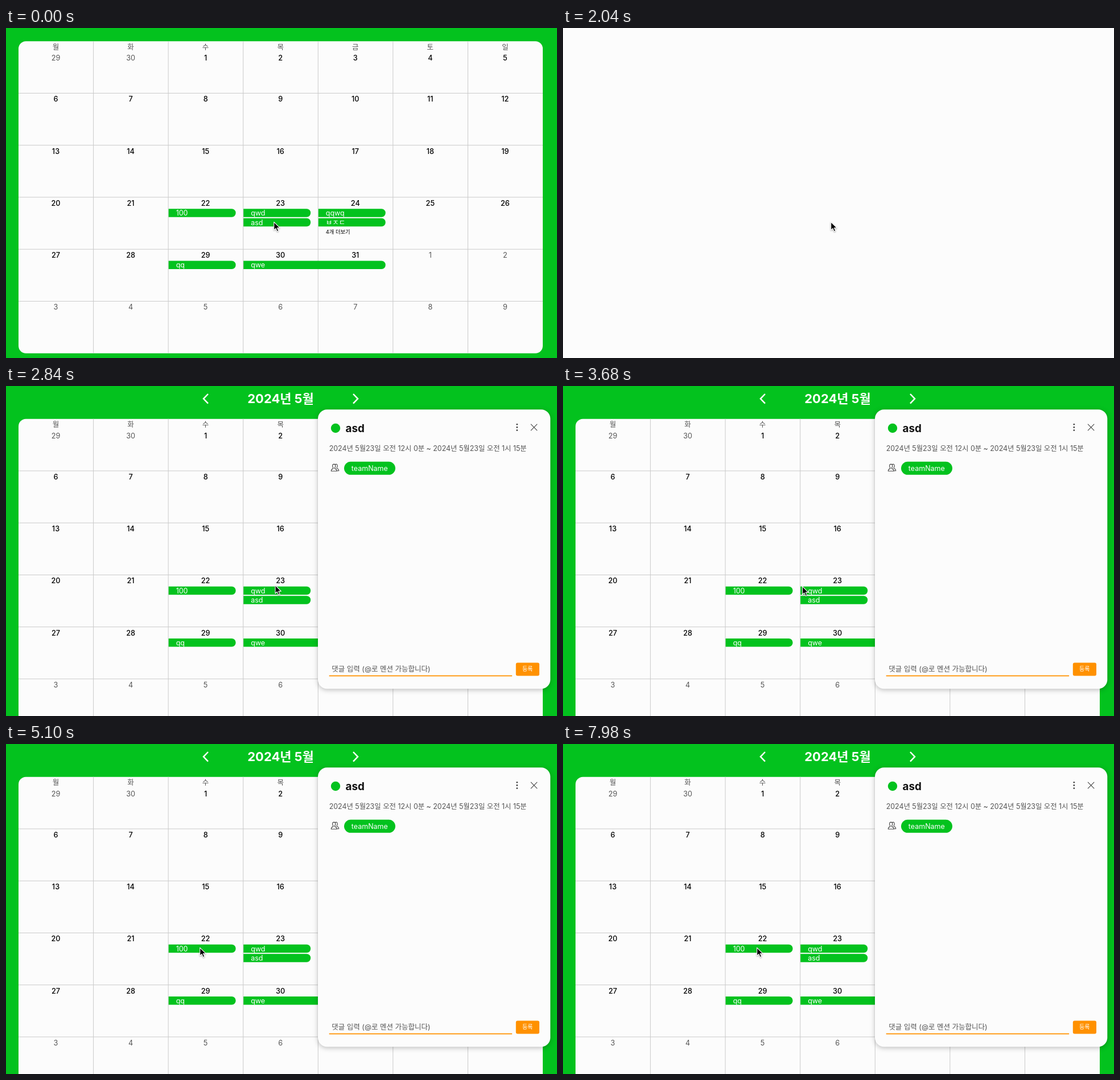
Animation, 968 px wide and 579 px high, one loop 8000 ms. Source, as an HTML page:

```html
<!DOCTYPE html>
<html lang="ko">
<head>
<meta charset="utf-8">
<title>Calendar</title>
<style>
  html, body { margin: 0; width: 100%; height: 100%; overflow: hidden; background: #fcfcfc; }
  svg { display: block; width: 968px; height: 579px; }
  text { font-family: Inter, 'Noto Sans CJK KR', 'Noto Sans CJK', sans-serif; font-size: 12.5px; }
  .mid { text-anchor: middle; }
  .muted { fill: #555; }
  .day { font-size: 12.7px; font-weight: 500; fill: #000; }
  .day.out { font-weight: 400; fill: #555; }
  .on { fill: #fff; }
  .line { fill: none; stroke: #444; stroke-width: 1.1; stroke-linecap: round; stroke-linejoin: round; }
</style>
</head>
<body>
<svg id="stage" viewBox="0 0 968 579"></svg>
<script>
const GREEN = '#03c21e', PAPER = '#fcfcfc', ORANGE = '#ff9100';
const LOOP = 8000, BLANK_AT = 2040, OPEN_AT = 2320, SCROLL = 34.5;
const LEFT = 22, TOP = 57.7, COL = 131.57, ROW = 91.25;

const stage = document.getElementById('stage');

function add(parent, tag, attrs = {}, content) {
  const node = document.createElementNS('http://www.w3.org/2000/svg', tag);
  for (const key in attrs) node.setAttribute(key, attrs[key]);
  if (content !== undefined) node.textContent = content;
  parent.appendChild(node);
  return node;
}
const rect = (parent, x, y, width, height, rx, fill) =>
  add(parent, 'rect', { x, y, width, height, rx, fill });
const label = (parent, x, y, content, cls = '', extra = {}) =>
  add(parent, 'text', { x, y, class: cls, ...extra }, content);

function drawEvent(parent, row, col, slot, title, days = 1) {
  const x = LEFT + col * COL + 0.5, y = TOP + row * ROW + 20.2 + slot * 16.5;
  const right = x + days * COL - 13.6, h = 14.7, r = 7;
  add(parent, 'path', {
    d: `M${x} ${y}H${right - r}a${r} ${r} 0 0 1 ${r} ${r}v${h - 2 * r}a${r} ${r} 0 0 1 ${-r} ${r}H${x}z`,
    fill: GREEN
  });
  label(parent, x + 13, y + 12, title, 'on');
}

function drawCalendar(parent) {
  rect(parent, 0, 0, 968, 640, 0, GREEN);
  label(parent, 482.5, 30, '2024년 5월', 'mid on', { style: 'font-size:22px;font-weight:700' });
  add(parent, 'path', {
    d: 'M355 14l-8 8.3 8 8.3M610 14l8 8.3-8 8.3',
    fill: 'none', stroke: '#fff', 'stroke-width': 2.5
  });
  rect(parent, LEFT, TOP, 7 * COL, 6 * ROW, 13, PAPER);

  let grid = '';
  for (let c = 1; c < 7; c++) grid += `M${LEFT + c * COL} ${TOP}v${6 * ROW}`;
  for (let r = 1; r < 6; r++) grid += `M${LEFT} ${TOP + r * ROW}h${7 * COL}`;
  add(parent, 'path', { d: grid, fill: 'none', stroke: '#cacaca' });

  const center = col => LEFT + (col + 0.5) * COL - 0.3;
  [...'월화수목금토일'].forEach((name, c) => label(parent, center(c), TOP + 14.3, name, 'mid muted'));
  for (let i = 0; i < 42; i++) {
    const row = Math.floor(i / 7), n = i - 1;
    const inMonth = n >= 1 && n <= 31;
    const date = n < 1 ? n + 30 : n > 31 ? n - 31 : n;
    label(parent, center(i % 7), TOP + row * ROW + (row ? 14.9 : 33.9), date,
      inMonth ? 'mid day' : 'mid day out');
  }

  drawEvent(parent, 3, 2, 0, '100');
  drawEvent(parent, 3, 3, 0, 'qwd');
  drawEvent(parent, 3, 3, 1, 'asd');
  drawEvent(parent, 3, 4, 0, 'qqwq');
  drawEvent(parent, 3, 4, 1, 'ㅂㅈㄷ');
  label(parent, LEFT + 4 * COL + 13.5, TOP + 3 * ROW + 64, '4개 더보기', '', { style: 'font-size:9.3px' });
  drawEvent(parent, 4, 2, 0, 'qq');
  drawEvent(parent, 4, 3, 0, 'qwe', 2);
}

function drawPanel(parent) {
  const card = rect(parent, 548, 41.3, 408.3, 490, 16, PAPER);
  card.style.filter = 'drop-shadow(0 2px 4px rgba(0,0,0,.25))';
  add(parent, 'circle', { cx: 579, cy: 74, r: 8.2, fill: GREEN });
  label(parent, 596.5, 81, 'asd', '', { style: 'font-size:18.8px;font-weight:700', fill: '#111' });
  for (const cy of [67.3, 72.5, 77.7]) add(parent, 'circle', { cx: 897.8, cy, r: 1.4, fill: '#444' });
  add(parent, 'path', { d: 'M922.3 67.2l10.6 10.6m0-10.6l-10.6 10.6', class: 'line' });
  label(parent, 567.7, 114.2, '2024년 5월23일 오전 12시 0분 ~ 2024년 5월23일 오전 1시 15분', 'muted',
    { style: 'font-size:12.4px' });

  // Two-person icon
  add(parent, 'path', {
    d: 'M571.3 149.3c0-3 1.3-3.7 3.6-4.4v-1.2c-2.2-2.7-1.6-6.6 1.3-6.6s3.5 3.900 1.300 6.600v1.200c2.400.7 3.700 1.400 3.700 4.400z' +
       'M578.5 137.600c3-1.500 5.300 1.800 2.700 5.700v1.200c2.300.7 3.500 1.400 3.500 4.300h-3.300',
    class: 'line', 'stroke-width': 1
  });
  rect(parent, 594, 132.8, 90, 23, 11.5, GREEN);
  label(parent, 638.8, 148.7, 'teamName', 'mid on');

  label(parent, 572.3, 500.6, '댓글 입력 (@로 멘션 가능합니다)', 'muted');
  rect(parent, 567.7, 507.6, 321.4, 1.8, 0, ORANGE);
  rect(parent, 895.8, 485.5, 41.2, 23, 3, ORANGE);
  label(parent, 916.3, 500.1, '등록', 'mid on', { style: 'font-size:10px;font-weight:500' });
}

const calendar = add(stage, 'g');
drawCalendar(calendar);
const panel = add(stage, 'g');
drawPanel(panel);
const pointer = add(stage, 'path', {
  d: 'M0 0V14.300L3.300 11.300L5.700 16.800L8.200 15.700L5.800 10.400H10.400Z',
  fill: '#000', stroke: '#fff', 'stroke-width': 1.1, 'stroke-linejoin': 'round'
});
pointer.style.filter = 'drop-shadow(0 1px 1px rgba(0,0,0,.35))';

// time, x, y
const PATH = [
  [0, 470.7, 340.3], [1060, 470.7, 340.3], [1061, 469.7, 337.8], [1160, 469.7, 337.8],
  [1161, 470.7, 340.3], [2600, 470.7, 340.3], [2840, 473, 349.7], [3140, 473, 349.7],
  [4140, 379.7, 353.3], [4240, 379.7, 353.3], [5100, 340.7, 357.3], [LOOP, 340.7, 357.3]
];

function pointerAt(t) {
  const i = PATH.findIndex(key => key[0] > t);
  const [t0, x0, y0] = PATH[i - 1], [t1, x1, y1] = PATH[i];
  const u = (t - t0) / (t1 - t0), k = u * u * (3 - 2 * u);
  return [x0 + (x1 - x0) * k, y0 + (y1 - y0) * k];
}

function render(t) {
  const open = t >= OPEN_AT, blank = t >= BLANK_AT && !open;
  calendar.setAttribute('display', blank ? 'none' : 'inline');
  calendar.setAttribute('transform', `translate(0 ${open ? 0 : -SCROLL})`);
  panel.setAttribute('display', open ? 'inline' : 'none');
  pointer.setAttribute('transform', `translate(${pointerAt(t)})`);
}

const start = performance.now();
function tick() {
  render((performance.now() - start) % LOOP);
  requestAnimationFrame(tick);
}
tick();
</script>
</body>
</html>
```
